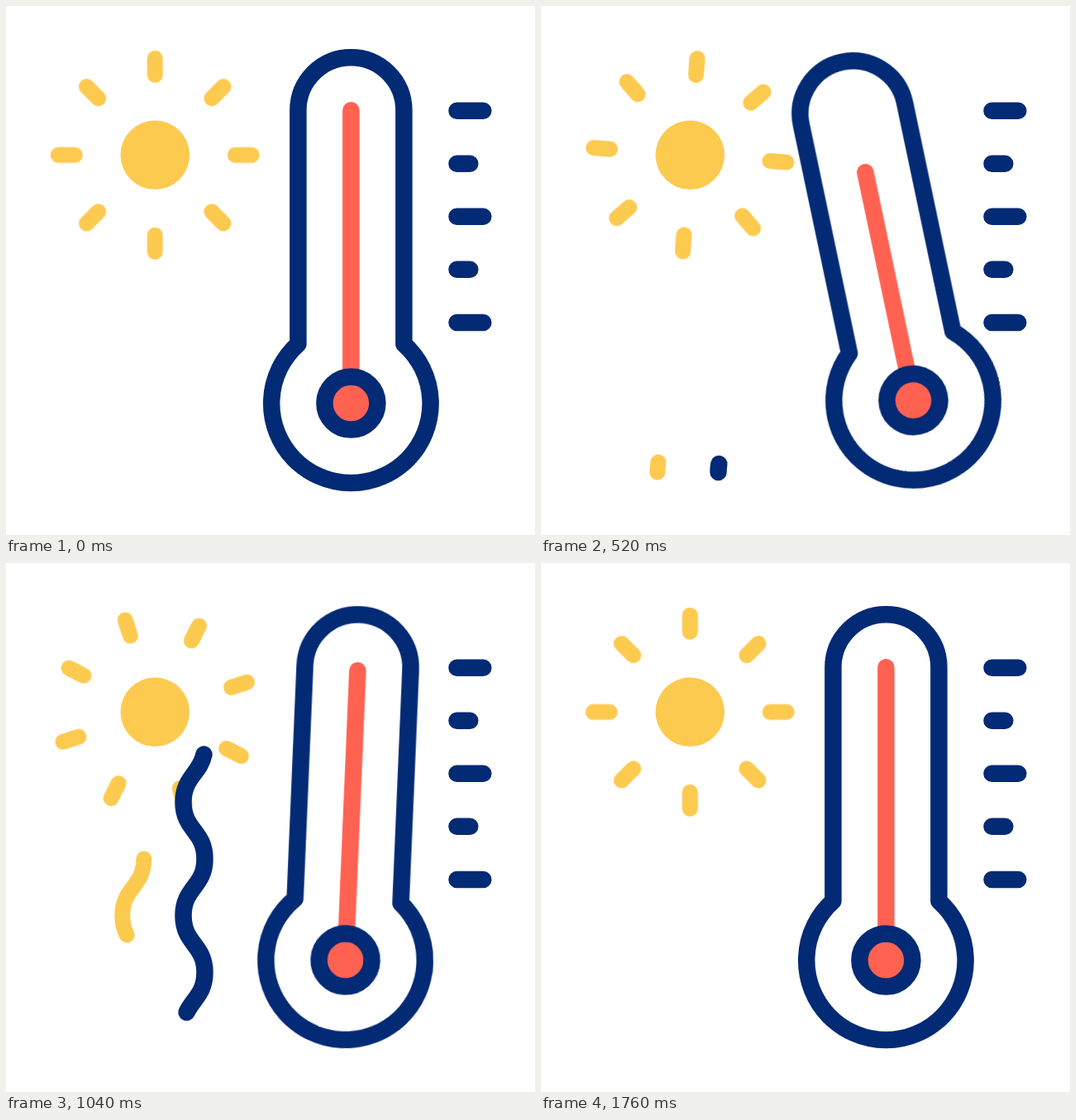
Animation of 640 by 640 pixels, one loop 2 s. Source, as an HTML page:

```html
<!DOCTYPE html>
<html lang="en">
<head>
<meta charset="utf-8">
<title>Hot weather</title>
<style>
  @property --from { syntax: "<number>"; inherits: false; initial-value: 0; }
  @property --to { syntax: "<number>"; inherits: false; initial-value: 0; }

  :root {
    --navy: #032a75;
    --yellow: #fdca50;
    --red: #ff6251;
    --ease: cubic-bezier(.333, 0, .667, 1);
  }
  html, body { margin: 0; width: 100%; height: 100%; overflow: hidden; background: #fff; }
  svg { display: block; width: 100%; height: 100%; }

  .line { fill: none; stroke: var(--navy); stroke-width: 20.5; stroke-linecap: round; stroke-linejoin: round; }
  .yellow { stroke: var(--yellow); stroke-width: 19; }
  .red { stroke: var(--red); }

  .rays, .thermo, .mercury { animation: 2s var(--ease) infinite; }
  .rays { animation-name: spin; }
  .thermo { animation-name: swing; transform-origin: 417.4px 320px; }
  .mercury { stroke-dasharray: 355 355; animation-name: level; }

  /* A wave grows from its foot, then its tail follows; lengths are percentages. */
  .wave {
    stroke-dasharray: calc((var(--to) - var(--from)) * 1px) 999px;
    stroke-dashoffset: calc(var(--from) * -1px);
    animation: 2s var(--ease) infinite;
  }
  .short { animation-name: short-head, short-tail, short-show; }
  .long { animation-name: long-head, long-tail, long-show; }

  @keyframes spin {
    0% { transform: rotate(0deg); animation-timing-function: cubic-bezier(.3, 0, .67, 1); }
    32.25% { transform: rotate(-45deg); }
    35.75% { transform: rotate(-45deg); animation-timing-function: cubic-bezier(.5, 0, .5, 1); }
    85%, 100% { transform: rotate(90deg); }
  }
  @keyframes swing {
    0% { transform: rotate(0deg); }
    25% { transform: rotate(-12deg); }
    47% { transform: rotate(4.5deg); }
    61% { transform: rotate(-2.5deg); }
    70%, 100% { transform: rotate(0deg); }
  }
  @keyframes level {
    0% { stroke-dashoffset: 0; }
    15.5% { stroke-dashoffset: 86; }
    57.5%, 100% { stroke-dashoffset: 0; }
  }
  @keyframes short-head { 0%, 22.9% { --to: 0; } 45.5%, 100% { --to: 100; } }
  @keyframes short-tail { 0%, 39.2% { --from: 0; } 63%, 100% { --from: 100; } }
  @keyframes long-head { 0%, 22.9% { --to: 0; } 55.4%, 100% { --to: 100; } }
  @keyframes long-tail { 0%, 46.9% { --from: 0; } 82.8%, 100% { --from: 100; } }
  @keyframes short-show {
    0%, 63%, 100% { opacity: 0; animation-timing-function: step-end; }
    22.9% { opacity: 1; animation-timing-function: step-end; }
  }
  @keyframes long-show {
    0%, 82.8%, 100% { opacity: 0; animation-timing-function: step-end; }
    22.9% { opacity: 1; animation-timing-function: step-end; }
  }
</style>
</head>
<body>
<svg viewBox="0 0 640 640">
  <defs>
    <path id="pair" d="M0-117v20M0 97v20"/>
  </defs>

  <g transform="translate(180.3 180.3)">
    <circle r="41.8" fill="var(--yellow)"/>
    <g class="line yellow rays">
      <use href="#pair"/>
      <use href="#pair" transform="rotate(45)"/>
      <use href="#pair" transform="rotate(90)"/>
      <use href="#pair" transform="rotate(135)"/>
    </g>
  </g>

  <path class="line yellow wave short" pathLength="100" d="M140.8 564
    c0-17 6.5-25.7 13-34.3s13-17.2 13-34.4
    c0-17-6.5-25.7-13-34.3s-13-17.2-13-34.4
    c0-17 6.5-25.7 13-34.3s13-17.2 13-34.4"/>
  <path class="line wave long" pathLength="100" d="M214.5 564
    c0-17 6.5-25.7 13-34.3s13-17.2 13-34.4
    c0-17-6.5-25.7-13-34.3s-13-17.2-13-34.4
    c0-17 6.5-25.7 13-34.3s13-17.2 13-34.4
    c0-17-6.5-25.7-13-34.3s-13-17.2-13-34.4
    c0-17 6.5-25.7 13-34.3s13-17.2 13-34.4"/>

  <g class="thermo">
    <path class="line" d="M353.4 409V126.2a64 64 0 0 1 128 0V409A96.2 96.2 0 1 1 353.4 409Z"/>
    <path class="line red mercury" d="M417.4 481V126.3"/>
    <circle class="line" cx="417.4" cy="480.6" r="32" style="fill: var(--red)"/>
  </g>

  <path class="line" d="M545.5 126.7h31.8M545.5 190.7h15.8M545.5 254.8h31.8M545.5 318.8h15.8M545.5 382.9h31.8"/>
</svg>
</body>
</html>
```
